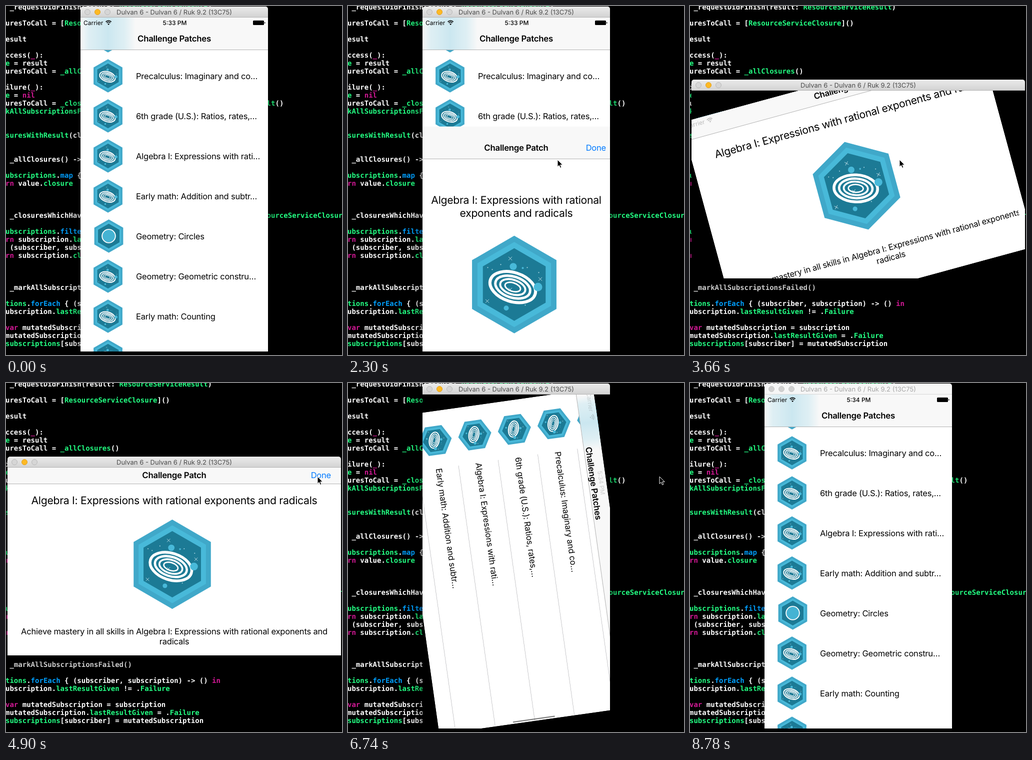
Write an HTML page that moves like this. It is 672x697 px and loops after 8880 ms.

```html
<!DOCTYPE html>
<html lang="en">
<head>
<meta charset="utf-8">
<title>Challenge patches</title>
<style>
  html, body { margin: 0; width: 100%; height: 100%; overflow: hidden; background: #000; }
  svg { display: block; width: 672px; height: 697px; }
  text { white-space: pre; text-rendering: geometricPrecision; font-family: Inter, Roboto, sans-serif; }
  .code { font: bold 14px "DejaVu Sans Mono", "Liberation Mono", monospace; fill: #fff; }
  .g { fill: #23ff83; }
  .p { fill: #d31895; }
  .b { fill: #00a0ff; }
  .bar { font-size: 13px; text-anchor: middle; }
  .title { font-size: 16.8px; font-weight: 600; letter-spacing: -.25px; text-anchor: middle; }
  .label { font-size: 16.5px; letter-spacing: -.2px; }
  .head { font-size: 21.2px; letter-spacing: -.29px; text-anchor: middle; }
  .body { font-size: 16.5px; letter-spacing: -.2px; text-anchor: middle; }
  .done { font-size: 16.5px; letter-spacing: -.2px; text-anchor: end; fill: #007aff; }
  .status { font-size: 12px; }
  .clock { font-size: 12px; font-weight: 500; text-anchor: middle; }
</style>
</head>
<body>
<script>
const LOOP = 8880;
const TURN = 375;            // length of one rotation
const TO_WIDE = 3310, TURN_WIDE = 3384;
const TO_TALL = 6540, TURN_TALL = 6672;
const OPEN = 2170, CLOSE = 5230;

const CODE = [
  [2, ' _requestDidFinish(result: |gResourceServiceResult|)'],
  [34, 'uresToCall = [|gResourceServiceClosure|]()'],
  [66, 'esult'],
  [98, 'ccess(|p_|):'],
  [114, '|ge| = result'],
  [130, 'uresToCall = |g_allClosures|()'],
  [162, 'ilure(|p_|):'],
  [178, '|ge| = |pnil|'],
  [194, 'uresToCall = |g_closuresWhichHaveNotBeenCalledSinceTheLatestResult|()'],
  [210, '|gkAllSubscriptionsFailed|()'],
  [258, '|gsuresWithResult|(closures)'],
  [306, ' _allClosures() -> []'],
  [338, '|gubscriptions|.|bmap| {'],
  [354, '|prn| value.|gclosure|'],
  [418, ' _closuresWhichHaveNotBeenCalledSinceTheLatestResult() -> [|gResourceServiceClosure|]'],
  [450, '|gubscriptions|.|bfilter| {'],
  [466, '|prn| subscription.|glastResultGiven|'],
  [482, ' (subscriber, subscription) in'],
  [498, '|prn| subscription.|gclosure|'],
  [562, ' _markAllSubscriptionsFailed()'],
  [594, '|gtions|.|bforEach| { (subscriber, subscription) -> () |pin|'],
  [610, 'ubscription.|glastResultGiven| != .|gFailure|'],
  [642, '|pvar| mutatedSubscription = subscription'],
  [658, 'mutatedSubscription.|glastResultGiven| = .|gFailure|'],
  [674, '|gsubscriptions|[subscriber] = mutatedSubscription']
];

// full label, and the shortened one for the narrow layout
const ROWS = [
  [''],
  ['Precalculus: Imaginary and complex numbers', 'Precalculus: Imaginary and co…'],
  ['6th grade (U.S.): Ratios, rates, and percentages', '6th grade (U.S.): Ratios, rates,…'],
  ['Algebra I: Expressions with rational exponents and radicals', 'Algebra I: Expressions with rati…'],
  ['Early math: Addition and subtraction within 100', 'Early math: Addition and subtr…'],
  ['Geometry: Circles'],
  ['Geometry: Geometric constructions', 'Geometry: Geometric constru…'],
  ['Early math: Counting'],
  ['']
];

const HEAD = {
  tall: ['Algebra I: Expressions with rational', 'exponents and radicals'],
  wide: ['Algebra I: Expressions with rational exponents and radicals', '']
};
const BODY = {
  tall: ['Achieve mastery in all skills in Algebra I:', 'Expressions with rational exponents and', 'radicals'],
  wide: ['Achieve mastery in all skills in Algebra I: Expressions with rational exponents and', 'radicals', '']
};

// pointer moves: start, end, from x, from y, to x, to y
const MOVES = [
  [110, 320, 537, 637, 598, 463],
  [570, 800, 598, 463, 598, 400],
  [1050, 1520, 598, 400, 419, 307],
  [4140, 4900, 419, 307, 623, 187],
  [7700, 7820, 623, 187, 657, 362]
];

const clamp = v => Math.min(1, Math.max(0, v));
const mix = (a, b, k) => a + (b - a) * k;
const smooth = v => { v = clamp(v); return v * v * (3 - 2 * v); };
const spring = ms => {
  const x = Math.max(0, ms) * 0.0177;
  return 1 - (1 + x) * Math.exp(-x);
};

function set(node, attrs) {
  for (const name in attrs) node.setAttribute(name, attrs[name]);
  return node;
}
function add(parent, tag, attrs, text) {
  const node = document.createElementNS('http://www.w3.org/2000/svg', tag);
  set(node, attrs || {});
  if (text) node.textContent = text;
  parent.appendChild(node);
  return node;
}
function say(node, text) {
  if (node.textContent !== text) node.textContent = text;
}
function show(node, on) {
  node.style.display = on ? '' : 'none';
}
function move(node, x, y, more) {
  set(node, { transform: `translate(${x} ${y}) ${more || ''}` });
}

const svg = add(document.body, 'svg', { viewBox: '0 0 672 697' });
const defs = add(svg, 'defs');

function clipRect(id) {
  return add(add(defs, 'clipPath', { id }), 'rect');
}
function gradient(id, vertical, stops) {
  const node = add(defs, 'linearGradient', vertical ? { id, x2: 0, y2: 1 } : { id });
  for (const [offset, color, opacity] of stops)
    add(node, 'stop', { offset, 'stop-color': color, 'stop-opacity': opacity });
}
const screenClip = clipRect('screen');
const viewClip = clipRect('view');
const labelClip = clipRect('labels');
gradient('active', true, [[0, '#ebebeb', 1], [1, '#d2d2d2', 1]]);
gradient('tint', false, [[0, '#d3ebf2', 0], [.15, '#d3ebf2', .7], [.5, '#cbe7f0', 1], [.8, '#d3ebf2', .7], [1, '#d3ebf2', 0]]);

// editor behind the window
for (const [y, line] of CODE) {
  const row = add(svg, 'text', { x: -1, y: y + 5, class: 'code' });
  line.split('|').forEach((part, i) => {
    if (part) add(row, 'tspan', i % 2 ? { class: part[0] } : {}, i % 2 ? part.slice(1) : part);
  });
}

// window frame
const shadow = add(svg, 'rect', { style: 'filter: blur(16px)' });
const back = add(svg, 'rect', { fill: '#000' });
const frame = add(svg, 'g');
const barShape = add(frame, 'path');
const barLine = add(frame, 'rect', { y: 21, height: 1, fill: '#b4b4b4' });
const lights = [14, 34, 54].map(cx => add(frame, 'circle', { cx, cy: 11, r: 5.5 }));
const barText = add(frame, 'text', { y: 15.7, class: 'bar' }, 'Dulvan 6 - Dulvan 6 / Ruk 9.2 (13C75)');

const screen = add(svg, 'g', { 'clip-path': 'url(#screen)' });
const stage = add(screen, 'g');
const view = add(stage, 'g', { 'clip-path': 'url(#view)' });
const paper = add(view, 'rect', { fill: '#fff' });

// badges
function hexagon(parent, r, fill) {
  const w = r * .866;
  add(parent, 'path', { d: `M0 ${-r}L${w} ${-r / 2}V${r / 2}L0 ${r}L${-w} ${r / 2}V${-r / 2}Z`, fill });
}
function badge(parent, circle) {
  const g = add(parent, 'g');
  hexagon(g, 97.5, '#40a8c9');
  hexagon(g, 85, '#48b9d9');
  hexagon(g, 72.5, '#1c7a95');
  if (circle) {
    add(g, 'circle', { r: 39, fill: '#45b3d3', stroke: '#fff', 'stroke-width': 5.5 });
    return g;
  }
  const dot = (cx, cy, r, fill) => add(g, 'circle', { cx, cy, r, fill });
  dot(-2, -36, 7, '#48b9d9');
  dot(-16, 47, 5, '#48b9d9');
  dot(17, -33, 2, '#48b9d9');
  const galaxy = add(g, 'g', { transform: 'translate(-3 5) rotate(18)', fill: 'none', stroke: '#fff' });
  [[47, 29, 6], [36, 21, 5], [26, 14.5, 4], [16, 8.5, 3]].forEach(([rx, ry, w]) =>
    add(galaxy, 'ellipse', { rx, ry, 'stroke-width': w }));
  dot(47.5, 5, 8.5, '#48b9d9');
  for (const [x, y] of [[-8, -52], [52, -11], [-54, 33], [-8, 10]])
    add(g, 'path', { d: `M${x - 3.5} ${y - 3.5}l7 7m0 -7l-7 7`, stroke: '#dff1f6', 'stroke-width': .8 });
  for (const [x, y] of [[-53, -34], [-27, -40], [26, -34], [49, -24], [22, 41], [-44, -30]])
    dot(x, y, 1.1, '#a9d6e3');
  return g;
}

function navBar(parent, title, tinted) {
  const bg = add(parent, 'rect', { fill: '#f8f8f8' });
  const tint = tinted && add(parent, 'rect', { width: 110, fill: 'url(#tint)' });
  const line = add(parent, 'rect', { height: 1, fill: '#b2b2b2' });
  const text = add(parent, 'text', { class: 'title' }, title);
  return L => {
    set(bg, { width: L.w, height: L.nav });
    if (tint) set(tint, { x: mix(0, 12, L.k), height: L.nav });
    set(line, { y: L.nav, width: L.w });
    set(text, { x: L.full / 2, y: L.titleY + 6 });
  };
}

// list of patches
const list = add(view, 'g');
const rows = ROWS.map(([full, short], i) => ({
  full,
  short: short || full,
  icon: badge(list, i === 5),
  text: add(list, 'text', { class: 'label' }),
  rule: add(list, 'rect', { height: .6, fill: '#a8a8ac' })
}));
const scroller = add(list, 'rect', { width: 2.4, rx: 1.2 });
const listNav = navBar(list, 'Challenge Patches', true);

// patch details
const sheet = add(view, 'g');
const sheetPaper = add(sheet, 'rect', { fill: '#fff' });
const labels = add(sheet, 'g', { 'clip-path': 'url(#labels)' });
const heads = HEAD.tall.map(() => add(labels, 'text', { class: 'head' }));
const bodies = BODY.tall.map(() => add(labels, 'text', { class: 'body' }));
const patch = badge(sheet);
const sheetNav = navBar(sheet, 'Challenge Patch');
const done = add(sheet, 'text', { class: 'done' }, 'Done');

// status line
const status = add(view, 'g');
add(status, 'text', { x: 6, y: 14.5, class: 'status' }, 'Carrier');
add(status, 'path', { d: 'M50.6 8.6a7.8 7.8 0 0 1 11 0M52.6 10.9a5 5 0 0 1 7 0', fill: 'none', stroke: '#000', 'stroke-width': 1.7 });
add(status, 'path', { d: 'M56.1 15l-1.9 -2.1a2.8 2.8 0 0 1 3.8 0Z' });
const clock = add(status, 'text', { y: 14.5, class: 'clock' });
const battery = add(status, 'path', { d: 'M1.5 0h19a1.5 1.5 0 0 1 1.5 1.5v6a1.5 1.5 0 0 1 -1.5 1.5h-19a1.5 1.5 0 0 1 -1.5 -1.5v-6a1.5 1.5 0 0 1 1.5 -1.5zM23 3a1.5 1.5 0 0 1 0 3z' });

const pointer = add(svg, 'path', {
  d: 'M0 0V14.2L3.3 11.2L5.6 16.4L7.9 15.4L5.7 10.3H10.2Z',
  fill: '#000', stroke: '#fff', 'stroke-width': 1
});

function layout(t) {
  const wide = t >= TO_WIDE && t < TO_TALL;
  const turn = smooth((t - (wide ? TURN_WIDE : TURN_TALL)) / TURN);
  const back = t >= TO_TALL;
  const k = wide ? turn : back ? 1 - turn : 0;
  return {
    wide, k,
    kind: wide ? 'wide' : 'tall',
    angle: wide ? -90 * (1 - turn) : back ? 90 * (1 - turn) : 0,
    full: wide ? 667 : 375,
    w: mix(375, 667, k),
    h: mix(667, 375, k),
    nav: mix(64, 32, k),
    titleY: mix(42, back ? 24 : 15, k)
  };
}

function drawFrame(t, L) {
  const x = L.wide ? 3 : 149, y = L.wide ? 147 : 1;
  const w = L.full, h = L.wide ? 375 : 667;
  const active = t < 8780;
  set(shadow, { x, y: y + 12, width: w, height: h + 22, opacity: active ? .6 : .35 });
  set(back, { x, y: y + 22, width: w, height: h });
  set(screenClip, { x, y: y + 22, width: w, height: h });
  move(frame, x, y);
  set(barShape, { d: `M0 22V5a5 5 0 0 1 5 -5H${w - 5}a5 5 0 0 1 5 5V22Z`, fill: active ? 'url(#active)' : '#f6f6f6' });
  set(barLine, { width: w, fill: active ? '#b4b4b4' : '#d8d8d8' });
  lights.forEach((light, i) => {
    const yellow = active && i === 1;
    set(light, {
      fill: yellow ? '#fdb924' : active ? '#d6d6d6' : '#d0d0d0',
      stroke: yellow ? '#e0a020' : active ? '#b9b9b9' : '#c8c8c8'
    });
  });
  set(barText, { x: w / 2, fill: active ? '#4a4a4a' : '#a5a5a5' });
  move(stage, x + w / 2, y + 22 + h / 2, `rotate(${L.angle}) translate(${-L.w / 2} ${-L.h / 2})`);
  set(viewClip, { width: L.w, height: L.h });
  set(paper, { width: L.w, height: L.h });
}

function drawList(t, L) {
  const turning = L.angle !== 0;
  rows.forEach((row, i) => {
    const y = mix(117, 85, L.k) + (i - 1) * 80;
    const x = mix(111, 115, L.k);
    move(row.icon, mix(55, 59, L.k) + (i === 5 ? 1.5 : 0), y - .5, 'scale(.342)');
    set(row.text, { x, y: y + 6 });
    say(row.text, L.wide ? row.full : row.short);
    set(row.rule, { x, y: y + 40, width: L.w - x });
    show(row.rule, turning);
  });
  const alpha = t < TO_TALL ? clamp((t - 5780) / 220) * .35 : clamp(L.k * 2) * .5;
  set(scroller, {
    x: L.w - 5, y: L.wide ? 178 : 167, height: L.wide ? 36 : 85, opacity: alpha
  });
  listNav(L);
}

function drawSheet(t, L) {
  const open = t < CLOSE ? spring(t - OPEN) : 1 - spring(t - CLOSE);
  show(sheet, open > .001);
  const top = open > .999 ? 0 : L.h * (1 - open);
  move(sheet, 0, top);
  set(sheetPaper, { width: L.w, height: L.h });
  set(labelClip, { x: 14, width: L.w - 28, height: L.h });
  heads.forEach((line, i) => {
    set(line, { x: L.full / 2, y: mix(154, 73, L.k) + i * 26 });
    say(line, HEAD[L.kind][i]);
  });
  bodies.forEach((line, i) => {
    set(line, { x: L.full / 2, y: mix(466, 333, L.k) + i * 20.4 });
    say(line, BODY[L.kind][i]);
  });
  move(patch, L.w / 2 - 4, mix(315.5, 193, L.k), `scale(${mix(1, .915, L.k)})`);
  sheetNav(L);
  set(done, {
    x: L.full - (L.wide ? 20 : 8), y: L.titleY + 6,
    opacity: t >= 5080 && t < 5250 ? .3 : 1
  });
}

function drawStatus(t, L) {
  set(status, { opacity: Math.pow(1 - L.k, .8) });
  set(clock, { x: L.full / 2 + 1 });
  say(clock, t < 2770 ? '5:33 PM' : '5:34 PM');
  move(battery, L.full - 30, 6);
}

function drawPointer(t) {
  show(pointer, t >= 110 && t < 7880);
  const [start, end, x0, y0, x1, y1] = MOVES.filter(m => m[0] <= t).pop() || MOVES[0];
  const p = smooth((t - start) / (end - start));
  move(pointer, mix(x0, x1, p), mix(y0, y1, p));
}

function draw(t) {
  const L = layout(t);
  drawFrame(t, L);
  drawList(t, L);
  drawSheet(t, L);
  drawStatus(t, L);
  drawPointer(t);
}

const begin = performance.now();
function tick() {
  draw((performance.now() - begin) % LOOP);
  requestAnimationFrame(tick);
}
tick();
</script>
</body>
</html>
```
